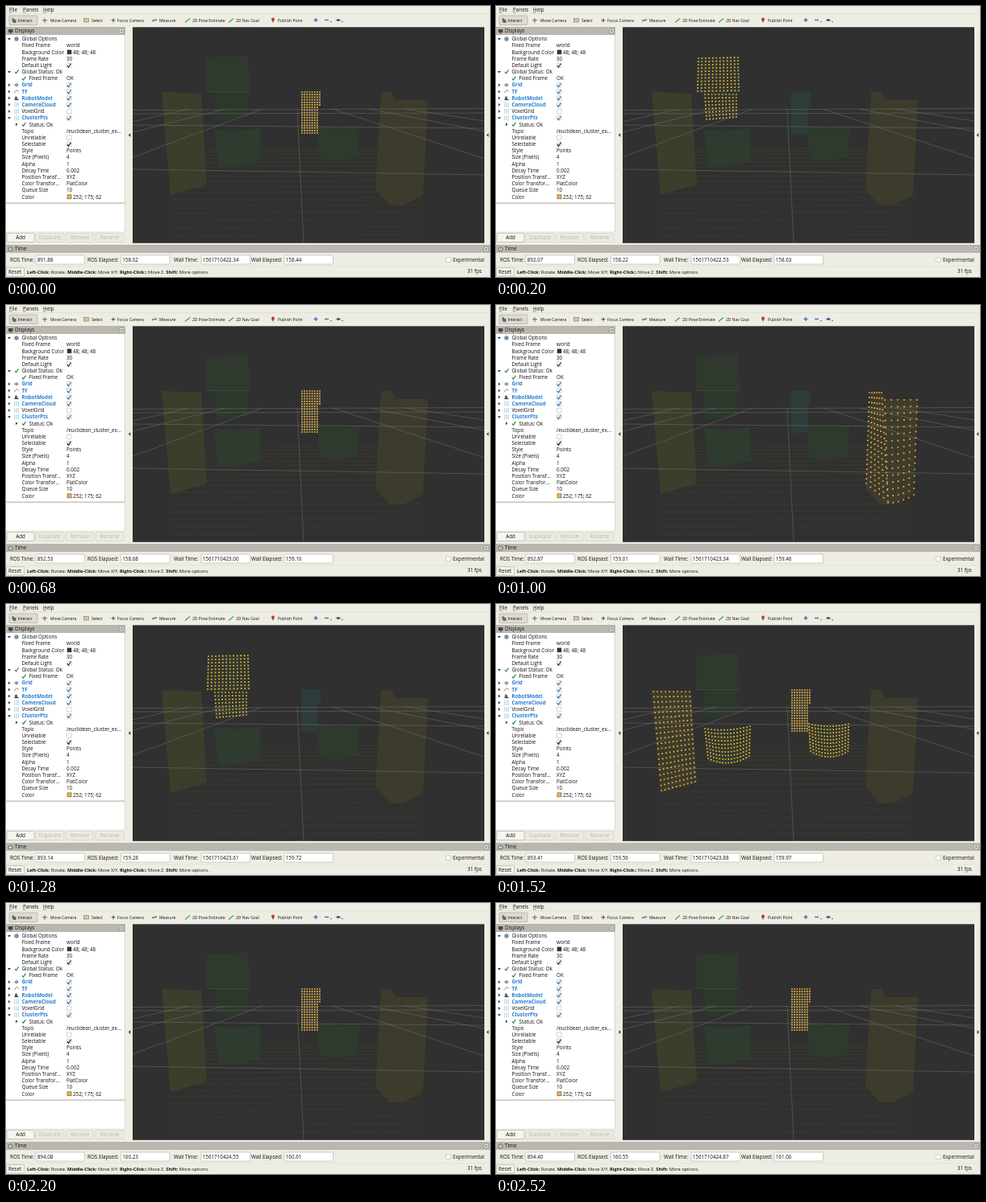
Animation of 600 by 337 pixels, one loop 2.6 s. Source, as an HTML page:

```html
<!DOCTYPE html>
<html lang="en">
<head>
<meta charset="utf-8">
<title>Point cloud clusters</title>
<style>
html, body { margin: 0; width: 100%; height: 100%; overflow: hidden; background: #eeede4; }
svg { display: block; width: 600px; height: 337px; }
text { font-family: "Open Sans", "Noto Sans", sans-serif; font-size: 6.3px; font-weight: 500; fill: #111; white-space: pre; }
.bold { font-weight: 700; }
.tool { font-size: 5px; }
.cluster { stroke: #fcaf3e; stroke-width: 1.7; visibility: hidden; }
</style>
</head>
<body>
<svg id="stage" viewBox="0 0 600 337"></svg>
<script>
const LOOP = 2600;
const PANEL = '#eeede4';
const stage = document.getElementById('stage');

// ---- SVG helpers ----
const text = (x, y, s, attrs = '') => `<text x="${x}" y="${y}" ${attrs}>${s}</text>`;
const rect = (x, y, w, h, fill, attrs = '') =>
  `<rect x="${x}" y="${y}" width="${w}" height="${h}" fill="${fill}" ${attrs}/>`;
const box = (x, y, w, h, fill = '#fff', line = '#b3b0a6') =>
  rect(x, y, w, h, fill, `rx="1" stroke="${line}" stroke-width=".6"`);
const poly = (points, fill) => `<polygon points="${points}" fill="${fill}"/>`;
const line = (d, color, width = 0.6) =>
  `<path d="${d}" fill="none" stroke="${color}" stroke-width="${width}"/>`;
const circle = (x, y, r, fill) => `<circle cx="${x}" cy="${y}" r="${r}" fill="${fill}"/>`;
const tick = (x, y, color = '#222') => line(`M${x - 2} ${y}l1.5 2l3-4.5`, color, 1.1);
const checkbox = (x, y, on, color) => box(x, y - 2.8, 5.6, 5.6) + (on ? tick(x + 2.5, y + 0.3, color) : '');
const mix = (a, b, t) => a + (b - a) * t;

// Path of small squares over a grid; place(u, v) returns [x, y] or null.
function dots(cols, rows, place, size = 1.7) {
  let d = '';
  for (let j = 0; j < rows; j++)
    for (let i = 0; i < cols; i++) {
      const p = place(i / (cols - 1), j / (rows - 1));
      if (p) d += `M${(p[0] - size / 2).toFixed(1)} ${p[1].toFixed(1)}h${size}`;
    }
  return d;
}

const quad = (tl, tr, br, bl) => (u, v) =>
  [0, 1].map(k => mix(mix(tl[k], tr[k], u), mix(bl[k], br[k], u), v));

const drum = (x0, x1, top, tilt, height, inset) => (u, v) => [
  mix(x0 + inset * v, x1 - inset * 0.3 * v, u),
  top - tilt * u + (3 + 4 * v) * 4 * u * (1 - u) + height * v];

const column = (u, v) => u > 0.86 && v > 0.34 ? null : [367 + 22 * u, 107 + 51 * v];

const clusters = {
  A: dots(8, 17, column),
  B: dots(6, 20, quad([463, 109], [478, 109], [486, 244], [459, 222])) +
     dots(6, 16, (u, v) => [mix(482, 522, u) - 4 * u * v + 4 * v * (1 - u),
                            118 + v * (128 - 10 * u * u)]),
  C: dots(10, 20, quad([195, 109], [240, 109], [247, 221], [205, 232])) +
     dots(15, 10, drum(259, 315, 155, 3, 37, 4)) +
     dots(14, 10, drum(388, 437, 149, 0, 34, 2)) +
     dots(8, 17, column),
  D: dots(12, 11, quad([251, 65], [300, 64], [301, 105], [250, 106])) +
     dots(10, 8, quad([259, 110], [298, 110], [298, 138], [261, 141]))
};

// ---- 3D view ----
function view() {
  let s = rect(157, 26.3, 436, 268.5, '#303030');
  for (let i = 0; i < 17; i++) {
    const y = 176 + 3.4 * i + 0.21 * i * i;
    s += line(`M${206 - i * 0.2} ${y + 2}L${518 - i * 0.3} ${y}`, '#3b3a2d', 0.9);
  }
  s += poly('193,107 242,109 249,222 204,235', '#3d3d2c');
  s += poly('249,64 300,62 303,106 248,107', '#2f392e');
  s += poly('258,107 299,107 299,138 260,143', '#2d382d');
  s += line('M250 106.5H302', '#34502f', 0.9);
  s += '<path d="M258 153Q286 159 315 151L316 193Q288 202 263 199Z" fill="#2f3b2e"/>';
  s += '<path d="M386 149Q412 155 438 150L437 188Q412 195 388 190Z" fill="#2e3a2d"/>';
  s += poly('465,107 477,107 483,117 523,117 517,235 492,248 476,248 458,228', '#3d3c2c');
  s += poly('366,106 390,107 390,125 386,125 387,158 366,159', '#2e3a39');
  s += line(dots(8, 17, column, 0.8), '#2f5854', 0.8);

  let grid = 'M157 129.5L593 127.5M157 134L593 133M157 148L593 152M157 203L593 210M361 128L369 294.8';
  [[318, 188], [272, 157], [227, 144]].forEach(([x, y]) => grid += `M${x} 128L157 ${y}`);
  [[405, 190], [450, 156], [495, 143]].forEach(([x, y]) => grid += `M${x} 128L593 ${y}`);
  s += line(grid, '#777', 0.45);
  for (const id in clusters) s += `<path class="cluster" id="${id}" d="${clusters[id]}"/>`;
  return s;
}

// ---- Menu and toolbar ----
function toolbar() {
  let s = '';
  [[4, 'File'], [21, 'Panels'], [46, 'Help']].forEach(([x, name]) => {
    s += text(x, 7, name) + line(`M${x} 8h3.5`, '#333', 0.5);
  });
  s += line('M0 9.7H600', '#dad8ce');
  s += box(4, 12, 35, 11.5, '#dddbd2', '#a5a298');
  [[14.5, 'Interact'], [55, 'Move Camera'], [106, 'Select'], [138, 'Focus Camera'], [190, 'Measure'],
   [231, '2D Pose Estimate'], [285, '2D Nav Goal'], [337, 'Publish Point']]
    .forEach(([x, name]) => s += text(x, 19.6, name, 'class="tool"'));
  s += poly('8,14.5 11,17 12.5,17 12.5,21 9,21 7.5,18', '#666');
  s += line('M45 17.8h6M48 15v6', '#555', 0.9);
  s += rect(96.5, 15.5, 6, 4.5, '#d8c88a', 'stroke="#777" stroke-width=".6"');
  s += line('M130 17.8h6M133 15v6', '#777', 0.7) + circle(133, 17.8, 1.3, '#555');
  s += line('M181 18.5l6-1.5', '#888', 2);
  [222, 276].forEach(x => s += line(`M${x} 20.5l6-5`, '#28b43c', 1.2));
  s += circle(331, 16.5, 2, '#b5432a') + poly('329.3,17 332.7,17 331,21', '#b5432a');
  s += line('M381.5 17.5h5M384 15v5M395 17.5h5', '#4779b8', 1.5);
  s += '<ellipse cx="412" cy="17.5" rx="3" ry="1.5" fill="#7b93b0"/>' + circle(412, 17.5, 1, '#222');
  s += poly('402,19 404,19 403,20.5', '#444') + poly('416,19 418,19 417,20.5', '#444');
  return s;
}

// ---- Displays tree ----
// [label, value or checkbox state, icon kind, arrow]; nested rows start with a tab.
const rows = [
  ['Global Options', '', 'globe', 'v'], ['Fixed Frame', 'world'], ['Background Color', '48; 48; 48', '#303030'],
  ['Frame Rate', '30'], ['Default Light', true], ['Global Status: Ok', '', 'tick', 'v'],
  ['\tFixed Frame', 'OK', 'tick'], ['Grid', true, 'link', '>'], ['TF', true, 'link', '>'],
  ['RobotModel', true, 'link', '>'], ['CameraCloud', true, 'link', '>'], ['VoxelGrid', false, 'cloud', '>'],
  ['ClusterPts', true, 'link', 'v'], ['\tStatus: Ok', '', 'tick', '>'], ['Topic', '/euclidean_cluster_ex...'],
  ['Unreliable', false], ['Selectable', true], ['Style', 'Points'], ['Size (Pixels)', '4'], ['Alpha', '1'],
  ['Decay Time', '0.002'], ['Position Transf...', 'XYZ'], ['Color Transfor...', 'FlatColor'],
  ['Queue Size', '10'], ['Color', '252; 175; 62', '#fcaf3e']
];

function treeRow([label, value, kind = '', arrow], i) {
  const y = 41 + 8.18 * i, indent = label[0] === '\t' ? 9 : 0, link = kind === 'link';
  const swatch = kind[0] === '#';
  let s = text(19.5 + indent, y + 2.2, label.trim(), link ? 'class="bold" style="fill:#2a7fd0"' : '');
  if (typeof value === 'boolean') s += checkbox(75.5, y, value, link ? '#2a6fb5' : '#222');
  else s += text(swatch ? 83 : 75, y + 2.2, value);
  if (swatch) s += rect(76, y - 2.5, 5, 5, kind, 'stroke="#333" stroke-width=".5"');
  if (kind === 'tick') s += tick(13 + indent, y, '#238a35');
  if (kind === 'globe') s += circle(13, y, 2.7, '#6f93b5');
  if (label === 'Grid') s += poly(`10,${y} 13,${y - 2.5} 16,${y} 13,${y + 2.5}`, '#8b9bb0');
  if (label === 'TF') s += line(`M10 ${y + 2}l3-4l3 2`, '#b77a45', 0.9);
  if (label === 'RobotModel') s += rect(11, y - 2, 3, 4, '#667') + rect(10.5, y + 1, 5, 1.5, '#445');
  if (/Cloud|Voxel|Cluster/.test(label))
    s += line(dots(3, 3, (u, v) => [10.8 + 4.5 * u, y - 2 + 4 * v], 1), '#4fa6d2', 1);
  const x = 4 + indent;
  if (arrow === 'v') s += poly(`${x - 2},${y - 1} ${x + 2},${y - 1} ${x},${y + 1.5}`, '#333');
  if (arrow === '>') s += poly(`${x - 1},${y - 2} ${x + 1.5},${y} ${x - 1},${y + 2}`, '#444');
  return s;
}

function panelBar(y, w, title, icon) {
  return rect(0, y, w, 9.5, '#b9b7af') + line(`M0 ${y}H${w}`, '#a3a199') + icon +
    text(11, y + 6.9, title) + box(w - 7.5, y + 2, 5.5, 5.5, '#eee', '#777') +
    line(`M${w - 6} ${y + 3.5}l2.5 2.5m0-2.5l-2.5 2.5`, '#333', 0.7);
}

function displays() {
  const monitor = rect(3, 29, 5.5, 4, '#444') + rect(4.5, 33.5, 2.5, 1, '#444');
  let s = panelBar(26.5, 148, 'Displays', monitor);
  s += rect(0, 36, 147, 208.5, '#fff') + line('M147.2 36V281', '#c4c1b8');
  s += rows.map(treeRow).join('');
  s += rect(0, 244.3, 147, 2, '#cfcdc4') + rect(0, 246.3, 147, 34, '#fff');
  [[1, 34, 'Add'], [37, 35, 'Duplicate'], [75, 33, 'Remove'], [111, 35, 'Rename']].forEach(([x, w, name], i) => {
    s += box(x, 282.5, w, 11, i ? '#ecebe3' : '#f6f5ef', i ? '#cfcdc4' : '#aaa79d');
    s += text(x + w / 2, 290.3, name, `text-anchor="middle" style="fill:${i ? '#b9b7af' : '#111'}"`);
  });
  s += poly('154.3,158 154.3,163 151.7,160.5', '#444') + poly('598.3,158 598.3,163 595.7,160.5', '#444');
  return s;
}

// ---- Time panel ----
// Seconds elapsed on each clock at the given ticks.
const ticks = [0, 6, 15, 23, 27, 33, 38];
const clocks = [
  { label: 'ROS Time:', x: 5, field: 37, start: 891.88, add: [0, .38, .99, 1.53, 1.79, 2.20, 2.52] },
  { label: 'ROS Elapsed:', x: 101, field: 142.5, start: 158.02, add: [0, .39, .99, 1.54, 1.79, 2.21, 2.53] },
  { label: 'Wall Time:', x: 208, field: 242, start: 1561710422.34, add: [0, .38, 1, 1.54, 1.79, 2.21, 2.53] },
  { label: 'Wall Elapsed:', x: 304, field: 345, start: 158.44, add: [0, .38, 1.02, 1.53, 1.79, 2.17, 2.56] }
];

function timePanel() {
  const clock = circle(5.7, 302.3, 2.9, '#555') + circle(5.7, 302.3, 2.1, '#eee') +
    line('M5.7 300.7v1.6h1.4', '#333');
  let s = panelBar(297.5, 600, 'Time', clock);
  clocks.forEach((c, i) => {
    s += text(c.x, 318, c.label) + box(c.field, 310, 60.5, 11) + text(c.field + 1.7, 318, '', `id="clock${i}"`);
  });
  s += checkbox(545.5, 315.8, false) + text(554, 318, 'Experimental');
  s += line('M0 323.8H600', '#dcdad1');
  s += box(0.5, 325.5, 22, 10.5, '#f5f4ee', '#aaa79d') + text(3, 333, 'Reset');
  const hint = [['Left-Click:', ' Rotate. '], ['Middle-Click:', ' Move X/Y. '],
                ['Right-Click::', ' Move Z. '], ['Shift:', ' More options.']]
    .map(([key, what]) => `<tspan class="bold">${key}</tspan>${what}`).join('');
  s += text(26, 333, hint, 'style="font-size:5.7px"') + text(572, 332, '31 fps');
  return s;
}

stage.innerHTML = rect(0, 0, 600, 337, PANEL) + view() + toolbar() + displays() + timePanel();

// ---- Animation ----
const sequence = 'AADDCBBBC' + 'CADDBBBBA' + 'CDDBCCCAC' + 'CDBBCAAAD' + 'BBA';
const marks = Object.keys(clusters).map(id => document.getElementById(id));
const readouts = clocks.map((c, i) => document.getElementById('clock' + i));

// Three updates in every 200 ms, at 0, 80 and 120.
function tickAt(ms) {
  const rest = ms % 200;
  return 3 * Math.floor(ms / 200) + (rest >= 80) + (rest >= 120);
}

function draw(now) {
  const k = tickAt(now % LOOP);
  marks.forEach(m => m.style.visibility = m.id === sequence[k] ? 'visible' : 'hidden');
  let i = 0;
  while (i < ticks.length - 2 && k >= ticks[i + 1]) i++;
  const part = (k - ticks[i]) / (ticks[i + 1] - ticks[i]);
  clocks.forEach((c, n) =>
    readouts[n].textContent = (c.start + mix(c.add[i], c.add[i + 1], part)).toFixed(2));
}

const begin = performance.now();
function loop() {
  draw(performance.now() - begin);
  requestAnimationFrame(loop);
}
loop();
</script>
</body>
</html>
```
